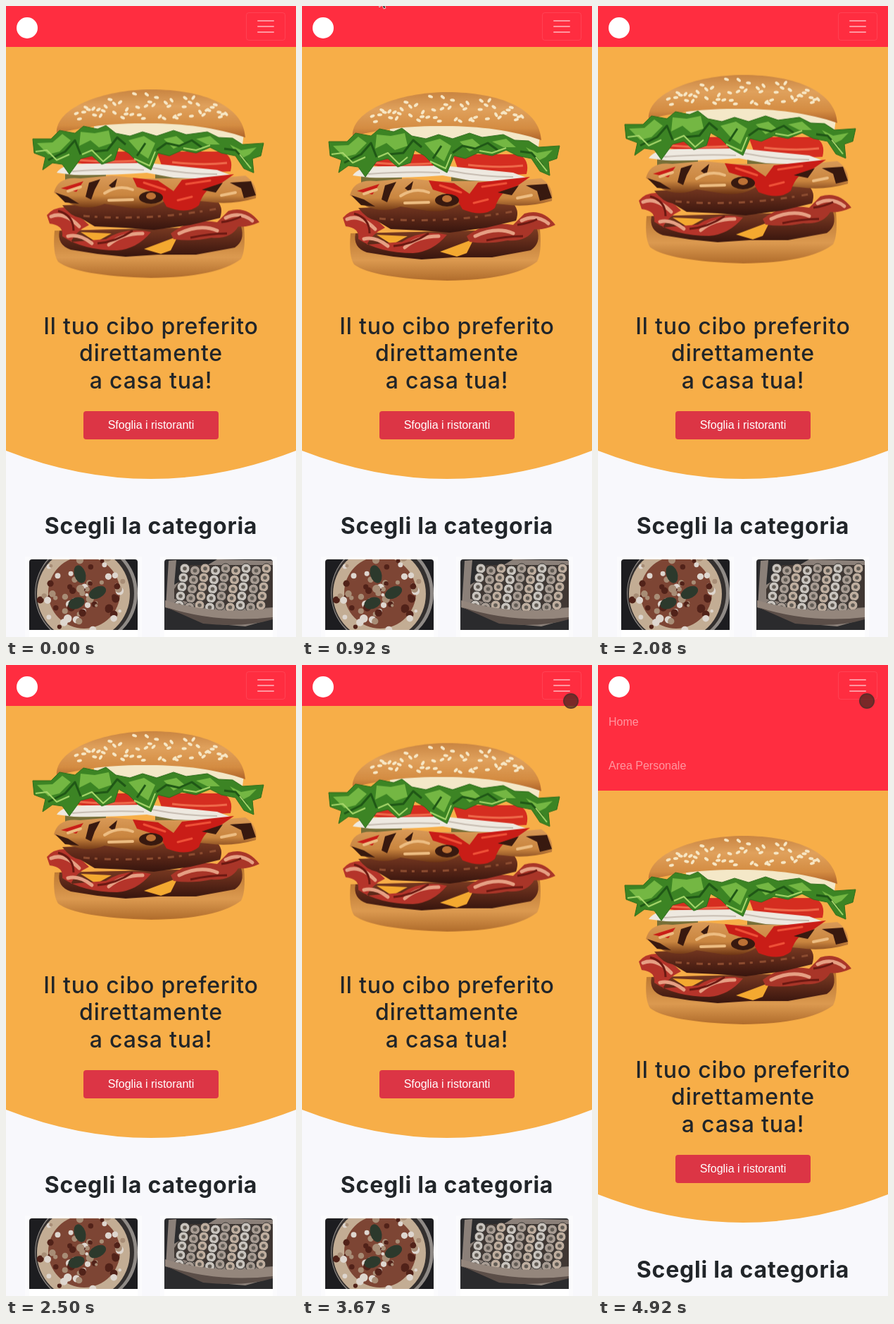
Write an HTML page that moves like this. It is 412 by 894 pixels and loops after 5.01 s.

```html
<!DOCTYPE html>
<html lang="it">
<head>
<meta charset="utf-8">
<title>Cibo a casa tua</title>
<style>
  html, body { margin: 0; width: 100%; height: 100%; overflow: hidden; }
  body { position: relative; background: #f8f8fc; font: 16px/24px "Liberation Sans", Arial, sans-serif; }
  nav { position: relative; box-sizing: border-box; padding: 50px 0 8px; background: #ff2d40; }
  .logo { position: absolute; left: 15px; top: 16px; width: 30px; height: 30px; border-radius: 50%; background: #fff; }
  .toggle { position: absolute; left: 341px; top: 9px; width: 54px; height: 38px; border: 1px solid #ffffff1a; border-radius: 4px; }
  .toggle svg { position: absolute; left: 12px; top: 4px; }
  .menu { height: 0; overflow: hidden; animation: open .35s ease 4.644s both paused; }
  .menu div { height: 62px; padding-left: 15px; line-height: 61px; color: #ffffff80; }
  .page { display: block; }
  .title { font: 500 32px Inter, sans-serif; letter-spacing: .8px; fill: #212529; text-anchor: middle; }
  .bold { font-weight: 700; }
  .btn { fill: #fff; text-anchor: middle; }
  .burger { animation: float 2s ease-in-out -1.41s infinite alternate paused; }
  .touch, .arrow { position: absolute; left: 0; top: 0; }
  .touch { left: 371px; top: 40px; width: 18px; height: 18px; border: 2px solid #50302a99; border-radius: 50%;
    background: #46281fb8; animation: arrive .33s ease-out 3.17s both paused; }
  .arrow { animation: pass .5s linear .49s both paused; }
  @keyframes open { from { height: 0; } to { height: 124px; } }
  @keyframes float { from { transform: translateY(-24.3px); } to { transform: translateY(5.7px); } }
  @keyframes arrive { from { transform: translate(50px, -4px); } to { transform: none; } }
  @keyframes pass {
    0% { transform: translate(386px, -24px); }
    20% { transform: translate(380px, -16px); }
    85% { transform: translate(109px, -15px); }
    100% { transform: translate(95px, -24px); }
  }
</style>
</head>
<body>
<nav>
  <div class="logo"></div>
  <div class="toggle">
    <svg width="30" height="30" fill="none" stroke="#ffffff80" stroke-width="2" stroke-linecap="round"><path d="M4 7h22M4 15h22M4 23h22"/></svg>
  </div>
  <div class="menu"><div>Home</div><div>Area Personale</div></div>
</nav>

<svg class="page" width="412" height="836" viewBox="0 58 412 836">
  <defs>
    <linearGradient id="crown" x2="0" y2="1">
      <stop stop-color="#c98542"/><stop offset=".35" stop-color="#e0a15c"/><stop offset=".75" stop-color="#d48c42"/><stop offset="1" stop-color="#b0642a"/>
    </linearGradient>
    <linearGradient id="heel" x2="0" y2="1">
      <stop stop-color="#b9752f"/><stop offset=".6" stop-color="#dc9a50"/><stop offset="1" stop-color="#b06c2c"/>
    </linearGradient>
    <linearGradient id="meat" x2="0" y2="1">
      <stop stop-color="#7a3b22"/><stop offset=".5" stop-color="#5a2718"/><stop offset="1" stop-color="#37150e"/>
    </linearGradient>
    <linearGradient id="grill" x2="0" y2="1">
      <stop stop-color="#d99a58"/><stop offset=".6" stop-color="#c9853f"/><stop offset="1" stop-color="#6e3514"/>
    </linearGradient>
    <clipPath id="pic1"><path d="M33 884V788a4 4 0 0 1 4-4H183a4 4 0 0 1 4 4V884Z"/></clipPath>
    <clipPath id="pic2"><path d="M225 884V788a4 4 0 0 1 4-4H375a4 4 0 0 1 4 4V884Z"/></clipPath>
  </defs>

  <path fill="#f7ae48" d="M0 58H412V630Q206 710 0 630Z"/>

  <g class="burger">
    <path fill="url(#heel)" d="M69 318Q66 350 74 362Q100 382 206 385Q300 384 334 358Q341 345 338 312Z"/>
    <!-- lower patty, cheese, bacon -->
    <path fill="url(#meat)" d="M76 318Q72 338 92 345L130 351 170 355 215 352 270 352 325 342Q340 332 334 312Z"/>
    <path fill="#f4a930" d="M106 320L150 322 128 334ZM196 344L244 326 234 346 220 351Z"/>
    <path fill="#b5342a" d="M58 296Q70 282 92 286L118 310Q100 318 92 334L142 330Q170 312 206 320Q186 344 158 346Q110 346 80 326Q82 310 62 308Z"/>
    <path fill="#a93528" d="M234 322Q262 300 300 306L316 290Q342 282 360 306Q342 314 330 312Q320 330 292 328Q264 334 238 330Z"/>
    <g fill="none" stroke="#e6a084" stroke-width="5" stroke-linecap="round">
      <path d="M64 298Q82 290 104 312M88 326Q104 322 122 336M146 338Q164 322 194 322"/>
      <path d="M246 322Q276 308 300 318M312 300Q332 290 350 304"/>
    </g>
    <path fill="none" stroke="#6b1912" stroke-width="3" d="M74 290Q96 296 96 318M130 336Q156 334 180 318M262 328Q290 322 314 322M306 306Q322 304 334 298"/>
    <!-- upper patty -->
    <path fill="url(#meat)" d="M80 282Q92 298 106 300L126 312 170 314 210 317 262 310 304 300Q310 284 298 274Z"/>
    <path fill="none" stroke="#8c4c30" stroke-width="3" stroke-dasharray="9 7 4 10" d="M110 297Q200 305 300 287"/>
    <!-- pickles, tomato, onion -->
    <path fill="#776f37" d="M84 236H142V248H84ZM212 236H300V250H212Z"/>
    <path fill="#d52d20" d="M86 206H206L188 225Q130 228 90 220ZM214 206H308Q324 214 319 234Q270 238 222 228Z"/>
    <path fill="none" stroke="#ef6a4b" stroke-width="3" d="M92 217Q140 222 184 219M236 221Q280 226 314 222"/>
    <path fill="#eee9e0" d="M72 236Q80 222 120 223L200 222 300 232 321 240Q290 246 238 243L200 236Q140 240 96 239Z"/>
    <path fill="none" stroke="#c7bdb2" stroke-width="2" d="M94 234Q150 230 196 232M208 229Q254 238 300 238"/>
    <!-- grilled chicken and sauce -->
    <path fill="url(#grill)" d="M68 264Q74 240 106 244L150 240 190 244 296 244 340 240Q358 252 355 272Q320 282 286 277L230 272Q210 290 178 286L140 280Q116 290 92 280Z"/>
    <path fill="#c91d17" d="M78 258L110 248 100 263ZM180 243L216 247 238 262 250 246 324 238 304 252Q282 256 274 282Q258 296 228 284L218 266 186 256Z"/>
    <path fill="none" stroke="#ef5138" stroke-width="3" stroke-linecap="round" d="M196 250L226 260M256 252L290 247M244 275L264 270"/>
    <g fill="#38190f">
      <path d="M118 250L134 245 126 260 121 274 113 270ZM70 264L88 270 104 280 84 278ZM146 254L158 244 154 260Z"/>
      <ellipse cx="206" cy="271" rx="17" ry="9"/>
      <path d="M278 260L308 250 298 264ZM318 250L348 248 355 268 338 272 334 258Z"/>
    </g>
    <ellipse cx="206" cy="269" rx="7" ry="5" fill="#bd7135"/>
    <path fill="none" stroke="#edbd82" stroke-width="4" stroke-linecap="round" d="M88 262L106 256M140 265Q160 252 180 260M146 275L180 274M306 268L326 264"/>
    <!-- crown -->
    <path fill="#f4e8c8" d="M124 160Q250 156 338 180L336 196Q240 184 126 184Z"/>
    <path fill="url(#crown)" d="M72 180C70 144 138 118 206 118C282 118 338 142 340 186C300 172 250 166 206 166C140 165 110 172 72 180Z"/>
    <g id="seeds" fill="#f7e7c5"></g>
    <!-- lettuce -->
    <path fill="#3c8424" stroke="#2c6d1b" stroke-linejoin="round" d="M38 188L64 188 76 176 98 180 110 170 130 174 142 169 156 180 176 184 194 178 214 184 238 176 256 182 286 178 302 186 322 187 336 196 366 194 362 212 350 216 352 236 338 230 326 212 306 208 290 200 270 208 250 204 232 212 216 208 206 232 188 222 174 208 160 200 154 218 136 224 122 212 106 216 90 238 80 224 66 222 52 232 56 214 40 208Z"/>
    <path fill="#74b743" d="M44 194L66 193 80 181 92 190 76 206 60 210ZM106 178L126 180 146 176 150 194 132 200 120 190 104 198ZM174 190L196 184 212 194 202 216 190 208ZM224 188L242 184 254 194 238 202ZM270 188L290 184 304 196 286 196ZM318 196L334 204 356 200 346 210 334 216Z"/>
    <path fill="none" stroke="#1f5716" stroke-width="3" stroke-linejoin="round" d="M60 218L84 206 98 190 106 210M124 206L144 204 158 186 170 196M186 212L198 194M214 204L228 194 246 198 264 190 278 200M310 202L326 204 342 222"/>
    <path fill="none" stroke="#a9d86c" stroke-width="2" stroke-linejoin="round" d="M42 206L58 204 72 218 90 210M108 210L122 204 138 220 150 210M182 216L204 226 212 206M252 201L270 204 290 197M332 210L348 230"/>
  </g>

  <g class="title">
    <text x="206" y="465">Il tuo cibo preferito</text>
    <text x="206" y="503">direttamente</text>
    <text x="206" y="542">a casa tua!</text>
    <text x="206" y="748" class="bold">Scegli la categoria</text>
  </g>
  <rect x="110" y="574" width="192" height="40" rx="4" fill="#dc3545"/>
  <text class="btn" x="206" y="599">Sfoglia i ristoranti</text>

  <path fill="#fbfbfd" d="M27 780H193V894H27ZM219 780H385V894H219Z"/>
  <path fill="#fff" d="M33 884H187V894H33ZM225 884H379V894H225Z"/>
  <g clip-path="url(#pic1)">
    <path fill="#1d1d20" d="M33 784H187V884H33Z"/>
    <circle cx="114" cy="832" r="73" fill="#8f8a86"/>
    <circle cx="112" cy="832" r="70" fill="#34302f"/>
    <circle cx="110" cy="833" r="66" fill="#c3ad94"/>
    <circle cx="111" cy="831" r="51" fill="#7d4534"/>
    <g id="toppings"></g>
    <g fill="#2c392c">
      <ellipse cx="105" cy="805" rx="8" ry="13" transform="rotate(-18 105 805)"/>
      <ellipse cx="130" cy="831" rx="13" ry="8" transform="rotate(-28 130 831)"/>
      <ellipse cx="100" cy="846" rx="12" ry="8" transform="rotate(-20 100 846)"/>
    </g>
  </g>
  <g clip-path="url(#pic2)">
    <path fill="#2b2b2d" d="M225 784H379V884H225Z"/>
    <path fill="#8b8079" d="M231 786L242 785 239 820 300 784 379 786V868L340 879 280 874 227 851Z"/>
    <path fill="#403733" d="M239 826L262 792 379 792V852Q310 858 239 840Z"/>
    <g id="rolls"></g>
    <path fill="#94867c" d="M226 842Q300 864 379 853V866Q300 876 226 852Z"/>
    <path fill="#5b4e48" d="M228 852Q300 875 379 866V869Q340 881 280 875Z"/>
  </g>
</svg>

<svg class="arrow" width="14" height="20" viewBox="-1 -1 14 20"><path stroke="#fff" d="M0 0V16L4 12.5 6.5 18 9 17 6.5 11.5H11.5Z"/></svg>
<div class="touch"></div>

<script>
  const LOOP = 5010, FPS = 12;
  let seed = 11;
  const rand = (a, b) => {
    seed = (seed * 16807) % 2147483647;
    return a + (b - a) * seed / 2147483647;
  };
  const fill = (id, count, shape) => {
    document.getElementById(id).innerHTML = Array.from({ length: count }, (_, i) => shape(i)).join('');
  };

  // sesame seeds, spread over the dome
  fill('seeds', 52, i => {
    const u = (i + rand(0, 1)) / 26 - 1;
    const x = 208 + u * 108;
    const y = 123 + 20 * u * u + rand(0, 36 - 16 * u * u);
    return `<ellipse cx="${x}" cy="${y}" rx="3.6" ry="2" transform="rotate(${rand(-60, 60)} ${x} ${y})"/>`;
  });

  fill('toppings', 70, i => {
    const a = rand(0, 2 * Math.PI), d = 62 * Math.sqrt(rand(0, 1));
    const color = ['#ded6cf', '#512219', '#a88d76'][i % 3];
    return `<circle cx="${110 + d * Math.cos(a)}" cy="${832 + d * Math.sin(a)}" r="${rand(2, 6)}" fill="${color}"/>`;
  });

  fill('rolls', 45, i => {
    const col = i % 9, row = Math.floor(i / 9);
    const x = 254 + col * 14.5 - row * 2, y = 797 + row * 13 + col % 2 * 3;
    const color = ['#c9c4be', '#a89c93', '#bfae9f'][col % 3];
    return `<circle cx="${x}" cy="${y}" r="7" fill="${color}" stroke="#393735"/><circle cx="${x}" cy="${y}" r="2.8" fill="#625c55"/>`;
  });

  // Hold every pose for one twelfth of a second.
  const anims = document.getAnimations();
  const start = performance.now();
  const tick = () => {
    const t = (performance.now() - start) % LOOP;
    const step = Math.min(59, Math.floor((t + 5) / 83.4));
    for (const a of anims) a.currentTime = step * 1000 / FPS;
    requestAnimationFrame(tick);
  };
  tick();
</script>
</body>
</html>
```
